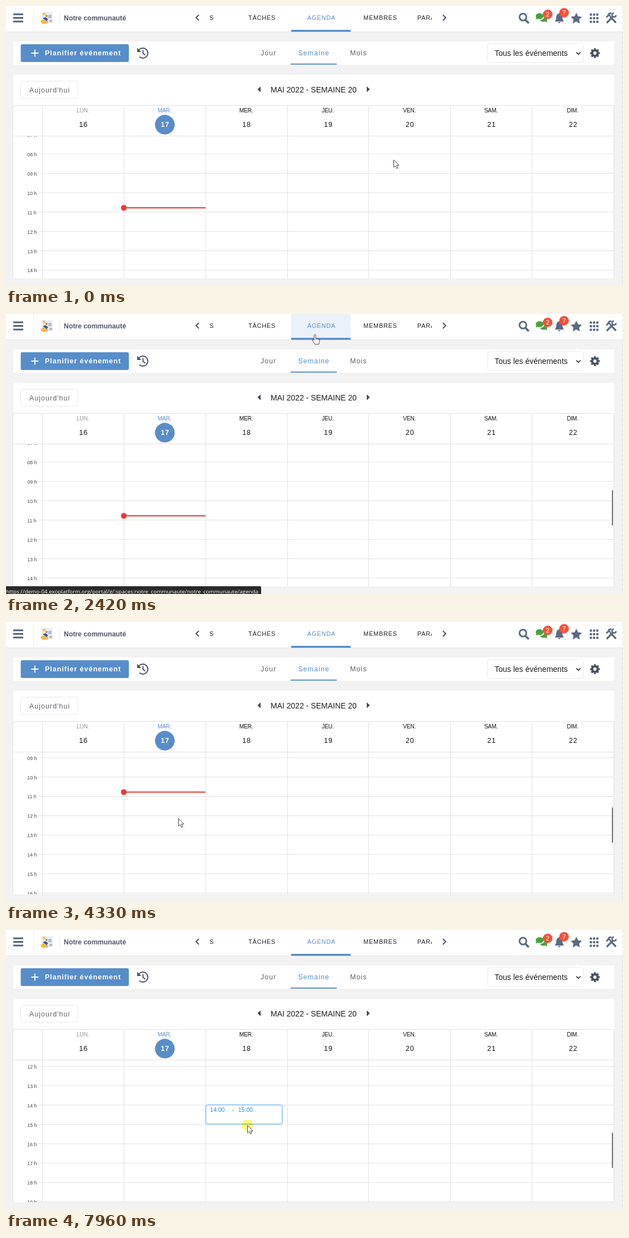
An HTML page that plays this animation: 1110 px wide and 505 px high, repeating every 8 s.

```html
<!DOCTYPE html>
<html lang="fr">
<head>
<meta charset="utf-8">
<title>Agenda</title>
<style>
html, body { margin: 0; width: 100%; height: 100%; overflow: hidden; background: #f2f2f2; }
svg { display: block; }
text { font-family: "Liberation Sans", Arial, sans-serif; }
.mid { text-anchor: middle; }
.tab { font-size: 11px; letter-spacing: .75px; fill: #222; }
.btn { font-size: 12.5px; letter-spacing: 1px; fill: #5c6068; }
.big { font-size: 14px; fill: #1c1c1c; }
.on, .btn.on { fill: #578dc9; }
.day { font-size: 10.2px; letter-spacing: -.2px; }
.num { font-size: 12.5px; letter-spacing: .9px; }
.hour { font-size: 8.8px; fill: #444; }
.slot { font-size: 10.6px; fill: #2490ea; }
.badge { font-size: 11.5px; fill: #fff; text-anchor: middle; }
.grid { stroke: #e0e0e0; }
.line { fill: none; stroke: #4a5168; stroke-width: 2; }
</style>
</head>
<body>
<svg width="1110" height="505" viewBox="0 0 1110 505">
  <defs>
    <clipPath id="body"><path d="M12 235h1082v256H12z"/></clipPath>
    <clipPath id="tabs"><path d="M350 0h416v46H350z"/></clipPath>
  </defs>
  <path d="M0 0h1110v505H0z" fill="#f2f2f2"/>
  <path d="M0 46.5h1110" stroke="#e6e6e6"/>
  <path d="M0 0h1110v46H0zM13 64h1081v42H13zM13 124h1081v367H13z" fill="#fff"/>
  <path d="M1109.5 0v505" stroke="#dedede" stroke-dasharray="5 4"/>

  <!-- top bar -->
  <path d="M13 15h18M13 21.5h18M13 28h18" stroke="#4f6183" stroke-width="2.8"/>
  <path d="M49.5 0v46M96.5 10v24" stroke="#ececec"/>
  <path d="M64 11h20v20H64z" fill="#eceef3"/>
  <path d="M66 12h5v5h-5z" fill="#f6c95a"/>
  <path d="M62 27l5-3 7 2 3 4-5 2h-7z" fill="#f1b94e"/>
  <path d="M66 22l5-2 5 4-3 3z" fill="#3d5a96"/>
  <path d="M76 16h6v6h-6zM78 25h5v4h-5z" fill="#b4bdcd"/>
  <circle cx="73" cy="18" r="1.8" fill="#b5683c"/>
  <text x="104" y="25.5" font-size="12.3" font-weight="bold" fill="#4d566b">Notre communauté</text>
  <path d="M347 16l-5 5 5 5M786 16l5 5-5 5" class="line"/>
  <path id="hover" d="M513 0h107v44H513z" fill="#ebf1f9"/>
  <path d="M513 43h107v3.5H513z" class="on"/>
  <g class="tab" clip-path="url(#tabs)">
    <text x="366" y="25">S</text>
    <text x="436" y="25">TÂCHES</text>
    <text x="542" y="25" class="on">AGENDA</text>
    <text x="643" y="25">MEMBRES</text>
    <text x="740" y="25">PARAMÈTRES</text>
  </g>
  <g fill="#5b6a86" stroke="#5b6a86" stroke-width="0">
    <circle cx="930" cy="20" r="6.2" fill="none" stroke-width="3"/>
    <path d="M934.5 25l6 6" stroke-width="3.8"/>
    <path d="M987 28q3-3 3-8 0-5 4-6v-1h3v1q4 1 4 6 0 5 3 8zM992.5 29h5.5q-2.7 4-5.5 0z"/>
    <path d="M1026 12l3.1 6.4 7 1-5 5 1.2 7-6.3-3.4-6.3 3.4 1.2-7-5-5 7-1z"/>
    <path d="M1052.2 13.5v18M1058 13.5v18M1063.8 13.5v18" stroke-width="4" stroke-dasharray="4 2.5"/>
    <path d="M1081.5 29.5l9.5-9.5M1088 20.5l8.5 8.5" stroke-width="3.2" stroke-linecap="round"/>
    <path d="M1093.5 12.5a3.6 3.6 0 1 0 4 4" fill="none" stroke-width="2.6"/>
    <path d="M1080 20.5l5.5-5.5M1083 14.5l4.5 4.5M1084 14.5q2-2 5-1.5" fill="none" stroke-width="3"/>
  </g>
  <g fill="#48a23f">
    <path d="M960 13c4 0 7 2.4 7 5.3s-3 5.3-7 5.3q-2 0-3.5-.6l-3.7 1.5 1.3-3q-1-1.5-1-3.2c0-2.9 3-5.3 6.9-5.3z"/>
    <path d="M968.5 18c3.5.5 5.5 2.5 5.5 5q0 1.6-1 3l1.3 3.5-4-1.5c-4.5 1.3-8.3-.2-9.7-3 5 .3 8.5-3 7.9-7z"/>
  </g>
  <g fill="#fa5037"><circle cx="974.5" cy="15" r="8.6"/><circle cx="1004" cy="12" r="8.6"/></g>
  <text x="974.5" y="19" class="badge">2</text>
  <text x="1004" y="16" class="badge">7</text>

  <!-- toolbar -->
  <rect x="26.5" y="69" width="194.5" height="32" rx="3" class="on"/>
  <path d="M45.5 85h13M52 78.5v13" stroke="#fff" stroke-width="1.8"/>
  <text x="70" y="89" class="btn" style="fill:#fff;font-weight:bold">Planifier événement</text>
  <path d="M239 79.5A9 9 0 1 1 240 91.5M246.5 79.5v6l4 3" class="line"/>
  <path d="M236 75.5v7.5h7.5z" fill="#4a5168"/>
  <text x="458" y="89" class="btn">Jour</text>
  <text x="525.5" y="89" class="btn on">Semaine</text>
  <text x="619" y="89" class="btn">Mois</text>
  <path d="M512 103.8h83v2h-83z" class="on"/>
  <rect x="866.5" y="67.5" width="172" height="34.5" rx="4" fill="none" stroke="#e9e9e9"/>
  <text x="879" y="90" class="big">Tous les événements</text>
  <path d="M1026 83.5l3.8 3.7 3.8-3.7" class="line" style="stroke:#333;stroke-width:1.7"/>
  <g fill="none" stroke="#4a5168">
    <circle cx="1059.5" cy="85" r="5" stroke-width="4.2"/>
    <circle cx="1059.5" cy="85" r="7.5" stroke-width="2.8" pathLength="16" stroke-dasharray="1.1 .9" stroke-dashoffset=".55"/>
  </g>

  <!-- calendar head -->
  <rect x="26.5" y="135.5" width="103" height="31" rx="3" fill="none" stroke="#e8e8e8"/>
  <text x="42" y="155.5" class="btn">Aujourd'hui</text>
  <path d="M458 145v10.5l-5.5-5.2zM649 145v10.5l5.5-5.2z" fill="#41475c"/>
  <text x="476" y="156" class="big">MAI 2022 - SEMAINE 20</text>
  <path d="M12 179.5h1082M12 234.5h1082M12.5 179v312" class="grid"/>
  <g id="days"></g>

  <g clip-path="url(#body)">
    <g id="hours"></g>
    <g id="slot">
      <rect id="frame" x="359.5" y="315.5" width="137.5" rx="3.5" fill="#fff" stroke="#3f9fe8"/>
      <text x="367" y="328" class="slot">14:00</text>
      <text x="407" y="328" class="slot" font-weight="bold">-</text>
      <text id="end" x="417.7" y="328" class="slot"></text>
    </g>
    <rect id="bar" x="1090" width="2" height="63.5" fill="#6b6b6b"/>
  </g>

  <g id="url">
    <path d="M0 491h457q2 0 2 2v12H0z" fill="#2a2a2a"/>
    <text x="0" y="504" fill="#fff" font-size="9.85" style="font-family:'Open Sans','Noto Sans',sans-serif">https://demo-04.exoplatform.org/portal/g/:spaces:notre_communaute/notre_communaute/agenda</text>
  </g>
  <g id="pointer">
    <circle id="press" r="10.3" fill="#fff97a" style="mix-blend-mode:multiply"/>
    <g fill="#fff" stroke="#444" stroke-linejoin="round">
      <path id="arrow" d="M.5.5v13.5l3.1-2.8 2.2 4.9 2.3-1-2.2-4.7h4.2z"/>
      <path id="hand" d="M-1.6 1.5a1.5 1.5 0 0 1 3 0V6.5l5 1.2q2 .5 1.9 2.5l-.6 4.2-1.1 3.1h-6.5l-1-2-3.6-4.5q-.8-1.6.8-2 1-.2 2.1 1.4zM1.4 6.5V9M4 7.2V9.5M6.4 7.8V10"/>
    </g>
  </g>
</svg>
<script>
const $ = id => document.getElementById(id);
const LOOP = 8000, HOUR = 34.9, COL = 146.85, SCROLL = 160.6;

$("days").innerHTML = ["LUN.", "MAR.", "MER.", "JEU.", "VEN.", "SAM.", "DIM."].map((name, i) => {
  const x = 65.5 + i * COL, mid = x + COL / 2, today = i === 1;
  const color = today ? "#578dc9" : i ? "#111" : "#999";
  return `<path class="grid" d="M${Math.floor(x) + .5} 179v312"/>
    <text class="mid day" x="${mid - .6}" y="192.3" fill="${color}">${name}</text>
    ${today ? `<circle class="on" cx="${mid}" cy="214" r="17.7"/>` : ""}
    <text class="mid num" x="${mid + .5}" y="218" ${today ? 'fill="#fff" font-weight="bold"' : 'fill="#111"'}>${16 + i}</text>`;
}).join("") + '<path class="grid" d="M1093.5 179v312"/>';

let rows = "";
for (let h = 6; h < 24; h++) {
  const y = 267 + (h - 8) * HOUR;
  rows += `<path class="grid" d="M58 ${y}h1036"/>
    <text class="hour" x="38.3" y="${y + 4}">${String(h).padStart(2, "0")} h</text>`;
}
$("hours").innerHTML = rows +
  '<path d="M212 364h147" stroke="#e53a30" stroke-width="2"/><circle cx="212" cy="364" r="5.2" fill="#ea3b31"/>';

// time, x, y of the pointer tip
const path = [
  [380, 697, 277], [520, 690, 266], [800, 590, 170], [1030, 527, 105], [1220, 540, 71],
  [1350, 576, 26], [1480, 578, 19], [1610, 563, 26], [1810, 556, 37],
  [2420, 556, 37], [2560, 540, 60], [2800, 465, 170], [3040, 402, 265], [3180, 388, 287],
  [3380, 378, 309], [3700, 328, 345], [3930, 310, 354],
  [4730, 310, 354], [4900, 368, 335], [5150, 436, 309],
  [5610, 436, 309], [5870, 440, 288], [6330, 435, 320],
  [6520, 435, 320], [6590, 435, 323], [6730, 435, 326], [7140, 434.5, 342.5],
  [7350, 434.5, 342.5], [7560, 434, 348], [7690, 434, 348], [7960, 434, 352]
];

function pointerAt(t) {
  const i = path.findIndex(k => k[0] > t);
  if (i === 0) return path[0].slice(1);
  if (i < 0) return path[path.length - 1].slice(1);
  const [t0, x0, y0] = path[i - 1], [t1, x1, y1] = path[i], k = (t - t0) / (t1 - t0);
  return [x0 + (x1 - x0) * k, y0 + (y1 - y0) * k];
}

const show = (id, on) => $(id).style.display = on ? "" : "none";

function draw(now) {
  const t = now % LOOP;
  const [x, y] = pointerAt(t);
  const onTab = y < 47;
  $("pointer").setAttribute("transform", `translate(${x} ${y})`);
  show("arrow", !onTab);
  show("hand", onTab);
  show("hover", onTab);
  show("url", t >= 1740 && t < 2700);
  show("press", t >= 6590);

  const p = Math.min(1, Math.max(0, (t - 4190) / 350));
  const s = p * p * (3 - 2 * p);
  $("hours").setAttribute("transform", `translate(0 ${-SCROLL * s})`);
  $("bar").setAttribute("y", 317.8 + 47.2 * s + (t >= 6660 ? .7 : 0));
  show("bar", t >= 70);

  // the new event grows by quarter hours
  const quarters = Math.max(1, Math.floor((y - 316) / (HOUR / 4)));
  show("slot", t >= 6660);
  $("frame").setAttribute("height", quarters * HOUR / 4 - .4);
  $("end").textContent = quarters < 4 ? `14:${quarters * 15}` : "15:00";
  requestAnimationFrame(draw);
}
requestAnimationFrame(draw);
</script>
</body>
</html>
```
